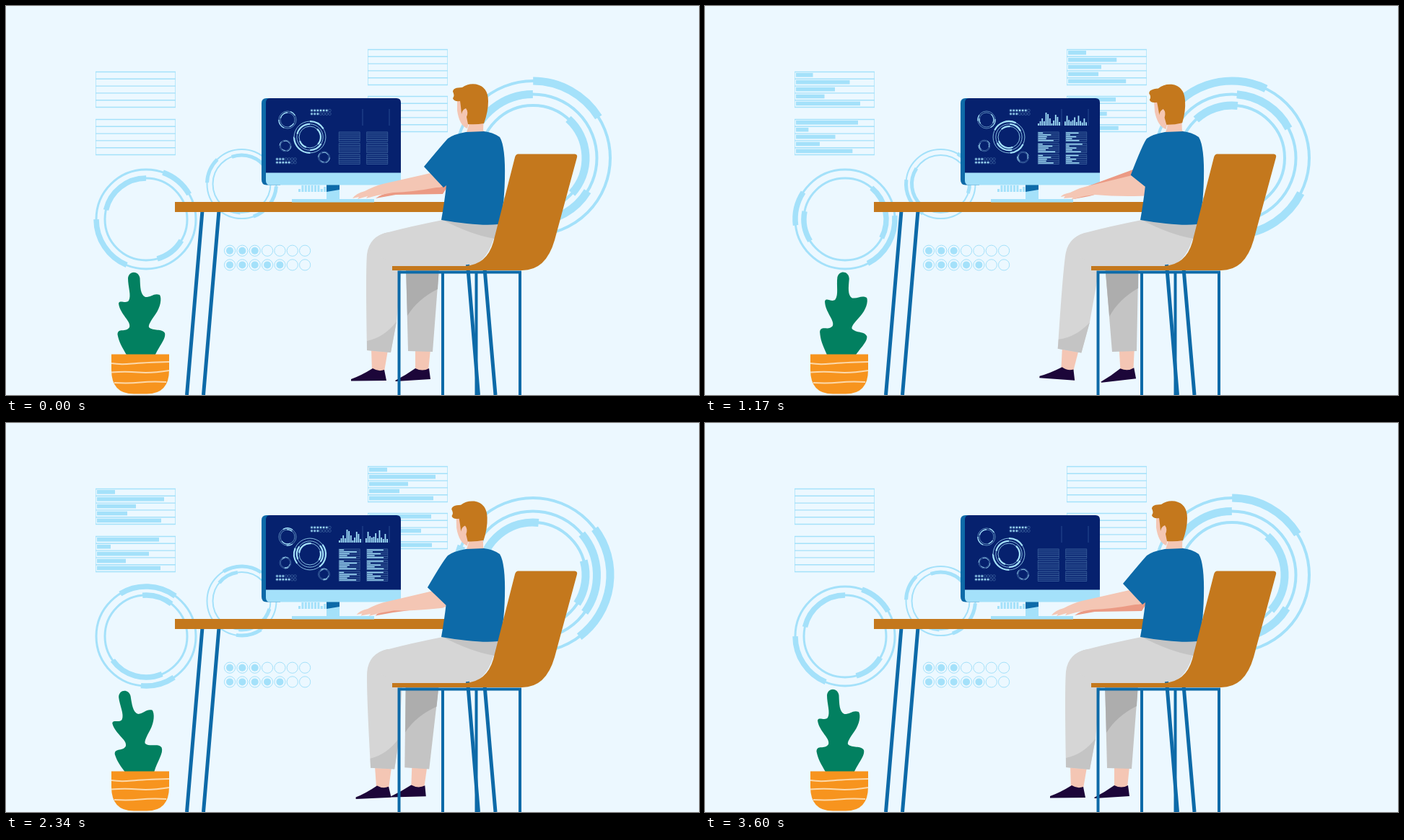
An HTML page with a canvas that plays this animation: 960 by 540 pixels, repeating every 3.63 s.

```html
<!DOCTYPE html>
<html lang="en">
<head>
<meta charset="utf-8">
<title>Working at a desk</title>
<style>
html, body { margin: 0; width: 100%; height: 100%; overflow: hidden; background: #ecf8ff; }
canvas { display: block; }
</style>
</head>
<body>
<canvas width="960" height="540"></canvas>
<script>
const ctx = document.querySelector('canvas').getContext('2d');
const SKY = '#a4e1fa', BLUE = '#0d6aa8', NAVY = '#06216e', WOOD = '#c4781d';
const SKIN = '#f4c6b4', SKIN_DARK = '#eb9a84', SHOE = '#1c0639';
const GREY = '#d6d6d6', GREY_MID = '#c4c4c4', GREY_DARK = '#adadad';
const LOOP = 3630, CYCLE = 3600, GROW = 900;

// Dial layers: radius, turning direction, thick arcs in degrees at time 0
const BIG = { thin: 4, thick: 11, layers: [
  [107, 1, [[-90, -32], [89, 179]]],
  [88.5, -1, [[-166, -90], [31.5, 89.5]]],
  [73, 1, [[-48, 42], [110, 159]]]] };
const MEDIUM = { thin: 3, thick: 7.5, layers: [
  [69, -1, [[-70, -30], [113, 180]]],
  [57, 1, [[193, 270], [31, 74]]]] };
const SMALL = { thin: 2, thick: 5, layers: [
  [48, 1, [[182, 225], [4, 70]]],
  [40, -1, [[-110, -30], [93, 136]]]] };

// Bar lists: final widths and the time each bar starts to grow
const LISTS = [
  { widths: [25, 93, 54, 42, 89], starts: [324, 450, 100, 324, 240] },
  { widths: [86, 19, 72, 40, 88], starts: [270, 350, 490, 430, 370] },
  { widths: [25, 92, 54, 42, 89], starts: [250, 513, 405, 200, 360] },
  { widths: [86, 30, 72, 40, 87], starts: [480, 500, 500, 450, 450] }];
const COLUMNS = [[3, 6, 10, 6, 18, 16, 10, 3, 7, 15, 12, 5], [6, 15, 9, 7, 8, 13, 6, 17, 7, 5, 12, 5]];

const clamp = v => Math.max(0, Math.min(1, v));
const ease = p => (1 - Math.cos(Math.PI * p)) / 2;

// Eased value at time t through [time, value] keys
function track(t, keys) {
  const i = keys.findIndex(k => k[0] > t);
  const [t0, v0] = keys[i - 1], [t1, v1] = keys[i];
  return v0 + (v1 - v0) * ease((t - t0) / (t1 - t0));
}

function fill(color, d) {
  ctx.fillStyle = color;
  ctx.fill(new Path2D(d));
}

function line(color, width, d) {
  ctx.strokeStyle = color;
  ctx.lineWidth = width;
  ctx.stroke(new Path2D(d));
}

function rect(color, x, y, w, h) {
  ctx.fillStyle = color;
  ctx.fillRect(x, y, w, h);
}

function placed(x, y, scale, draw) {
  ctx.save();
  ctx.translate(x, y);
  ctx.scale(scale, scale);
  draw();
  ctx.restore();
}

function turned(degrees, x, y, draw) {
  ctx.save();
  ctx.translate(x, y);
  ctx.rotate(degrees * Math.PI / 180);
  ctx.translate(-x, -y);
  draw();
  ctx.restore();
}

function arc(r, from, to, width) {
  ctx.beginPath();
  ctx.arc(0, 0, r, from * Math.PI / 180, to * Math.PI / 180);
  ctx.lineWidth = width;
  ctx.stroke();
}

function dial(x, y, scale, { thin, thick, layers }, t) {
  placed(x, y, scale, () => {
    ctx.strokeStyle = SKY;
    for (const [r, dir, arcs] of layers) {
      const turn = dir * t / CYCLE * 360;
      arc(r, 0, 360, thin);
      for (const [from, to] of arcs) arc(r, from + turn, to + turn, thick);
    }
  });
}

function dots(x, y, scale, counts) {
  placed(x, y, scale, () => {
    counts.forEach((count, row) => {
      for (let i = 0; i < 7; i++) {
        ctx.beginPath();
        ctx.arc(i * 17.35, row * 19.7, 7.6, 0, 7);
        ctx.strokeStyle = SKY;
        ctx.lineWidth = 1;
        ctx.stroke();
        if (i >= count) continue;
        ctx.beginPath();
        ctx.arc(i * 17.35, row * 19.7, 5, 0, 7);
        ctx.fillStyle = SKY;
        ctx.fill();
      }
    });
  });
}

function barList(x, y, scale, { widths, starts }, t) {
  placed(x, y, scale, () => {
    line(SKY, 0.7, 'M.5 0V49.5M110.5 0V49.5');
    for (let i = 0; i < 6; i++) line(SKY, 1.4, `M0 ${i * 9.8 + 0.5}H111`);
    widths.forEach((w, i) => rect(SKY, 2, i * 9.9 + 2, w * clamp((t - starts[i]) / GROW), 5.6));
  });
}

function columns(x, heights, delay, t) {
  line('#31569a', 0.8, `M${x + 33} 143V166`);
  heights.forEach((h, i) => {
    const grown = h * clamp((t - delay - i * 37 % 130) / GROW);
    rect(SKY, x + i * 2.65, 166 - grown, 1.8, grown);
  });
}

function background(t) {
  rect('#ecf8ff', 0, 0, 960, 540);
  dial(730, 211, 1, BIG, t);
  dial(194, 296, 1, MEDIUM, t);
  dial(326.5, 247, 1, SMALL, t);
  [[124, 91], [124, 157], [501, 60], [501, 125]].forEach(([x, y], i) => barList(x, y, 1, LISTS[i], t));
  dots(310, 339.7, 1, [3, 5]);
  [4, 9, 9, 9, 9, 9, 9, 4, 7].forEach((h, i) => rect(SKY, 405 + i * 4.4, 258 - h, 3, h));
}

function desk() {
  line(BLUE, 5, 'M272 284L250.5 540M295 284L273.5 540');
  rect(WOOD, 234, 272, 400, 14);
}

function monitor(t) {
  rect(SKY, 396, 268, 114, 4.5);
  rect(SKY, 444, 247, 18, 22);
  fill(BLUE, 'M444 247H462V255L444 258Z');
  fill(BLUE, 'M361 128H380V248.500H361Q354 248.500 354 241V135Q354 128 361 128Z');
  fill(NAVY, 'M366 128H541Q547 128 547 134V232H360V134Q360 128 366 128Z');
  fill(SKY, 'M360 231.500H547V242.500Q547 248.500 541 248.500H366Q360 248.500 360 242.500Z');
  dial(421, 182, 0.205, BIG, t);
  dial(390, 158, 0.175, MEDIUM, t);
  dial(387, 194, 0.165, SMALL, t);
  dial(440.5, 210, 0.165, SMALL, t);
  dots(423.500, 145, 0.24, [6, 3]);
  dots(375.500, 212.500, 0.24, [3, 5]);
  columns(461, COLUMNS[0], 50, t);
  columns(498, COLUMNS[1], 320, t);
  for (let i = 0; i < 6; i++) {
    barList(i % 2 ? 499.5 : 461, 175 + (i >> 1) * 15.6, 0.265, LISTS[(i + 2) % 4], t);
  }
}

function legs(sway) {
  turned(sway * (sway > 0 ? -3.6 : -2.7), 577, 355, () => {
    fill(SKIN, 'M567 477H588L585 506H567Z');
    fill(SHOE, 'M539 520Q553 513 567 503Q577 508 586 503L588 518L540 521Z');
    fill(GREY_MID, 'M554 362H600L591 480L557 479Z');
    fill(GREY_DARK, 'M554 362H600L598 393Q570 407 556 430Z');
  });
  turned(sway * (sway > 0 ? 5.3 : 2.6), 522, 340, () => {
    fill(SKIN, 'M506 476L529 478L524 507H507Z');
    fill(SHOE, 'M478 518Q492 513 508 503Q516 508 524 505L527 520L478 520.500Z');
    fill(GREY, 'M560 330L530 314Q503 319 500 345Q498 370 500 478L533 481L541 438L548 364Z');
    fill(GREY_MID, 'M500 465Q524 460 541 438L533 481L500 478Z');
  });
  fill(GREY, 'M605 297Q560 306 530 314Q508 318 503 338L540 362H640Q664 358 675 325L684 300Z');
  fill(GREY_MID, 'M603 296Q645 318 677 323L685 298Z');
}

function arms(a) {
  // Points are given at rest and fully moved
  const at = (x0, y0, x1, y1) => `${x0 + (x1 - x0) * a} ${y0 + (y1 - y0) * a} `;
  fill(SKIN_DARK, 'M' + at(512, 267, 511, 268) + 'Q' + at(520, 261, 517, 259) + at(535, 258, 530, 250) +
    'L' + at(604, 245, 597, 225) + at(612, 250, 608, 240) + at(605, 261, 600, 246) + at(540, 262, 532, 264) + 'Z');
  fill(SKIN, 'M' + at(480, 267, 493, 265) + 'Q' + at(485, 260, 495, 261) + at(497, 257, 506, 259) +
    'Q' + at(510, 250, 522, 251) + at(522, 247, 535, 249) + 'L' + at(588, 232, 596, 234) +
    at(611, 246, 617, 251) + 'Q' + at(608, 252, 614, 264) + at(596, 252, 605, 264) +
    'Q' + at(565, 258, 570, 265) + at(536, 259, 540, 262) + 'L' + at(514, 263, 526, 264) + at(499, 267, 507, 269) +
    'L' + at(501, 264, 510, 266) + at(487, 268, 497, 267) + at(489, 265, 499, 264) + 'Z');
  fill(BLUE, 'M637 175Q620 178 612 184Q' + at(603, 194, 607, 190) + at(579, 223, 590, 235) +
    'L' + at(606, 252, 614, 254) + 'L610 249Q607 275 603 297Q655 306 682 303Q690 285 691 240Q692 195 684 182Q674 175 662 174Z');
}

function head(a) {
  turned(-4 * a, 652, 175, () => {
    fill(SKIN, 'M625 128V145Q628 166 639 170L641 163V175H661L662 140L640 124Z');
    fill(WOOD, 'M619 119Q619 113 632 113Q640 107 651 108.500Q668 112 668 132Q668 147 662 163Q651 165 640 164L638 154Q641 147 637 142Q632 144 631 150Q630 138 629 132Q620 133 619 128Q622 124 619 119Z');
  });
  fill(SKIN, 'M641 166H660V172L664 175H638Z');
}

function chair() {
  line(BLUE, 5, 'M639.500 359L654.500 540M663 364L678 540');
  line(BLUE, 4, 'M544.500 540V369.500H712V540M605 369V540M651.500 369V540');
  fill(WOOD, 'M709 205.500H788Q792 206 791 210L760 325Q748 367 715 367H535V361H636Q666 359 675 328L705 210Q706 206 709 205.500Z');
}

function plant(sway) {
  turned(8.2 * sway, 187, 490, () => fill('#028060',
    'M169 378C170 367 184 367 185.500 378C186 390 186 401 193 404C202 404 205 398 213 401C216 406 214 418 207 428' +
    'C200 438 197 443 198 446C204 452 216 447 220 454C222 462 212 472 206 486V494H168V486C160 472 157 468 154.500 456' +
    'C155 446 166 454 171 446C174 438 158 428 156 413C157 407 166 414 170 409C174 402 169 390 169 378Z'));
  fill('#f7941e', 'M146 483.500H226V505Q226 538.500 195 538.500H177Q146 538.500 146 505Z');
  line('#fcd9ab', 2, 'M146 496Q158 498 174 496.500T226 494M146 508.500Q165 507 183 508.500T226 506M150 523Q170 524 186 522.500T222 522');
}

function draw(now) {
  const t = now % LOOP % CYCLE;
  const sway = track(t, [[0, 0], [900, 1], [2700, -1], [CYCLE, 0]]);
  const reach = track(t, [[0, 0], [900, 1], [CYCLE, 0]]);
  background(t);
  desk();
  monitor(t);
  legs(sway);
  head(reach);
  arms(reach);
  chair();
  plant(sway);
  requestAnimationFrame(draw);
}
requestAnimationFrame(draw);
</script>
</body>
</html>
```
